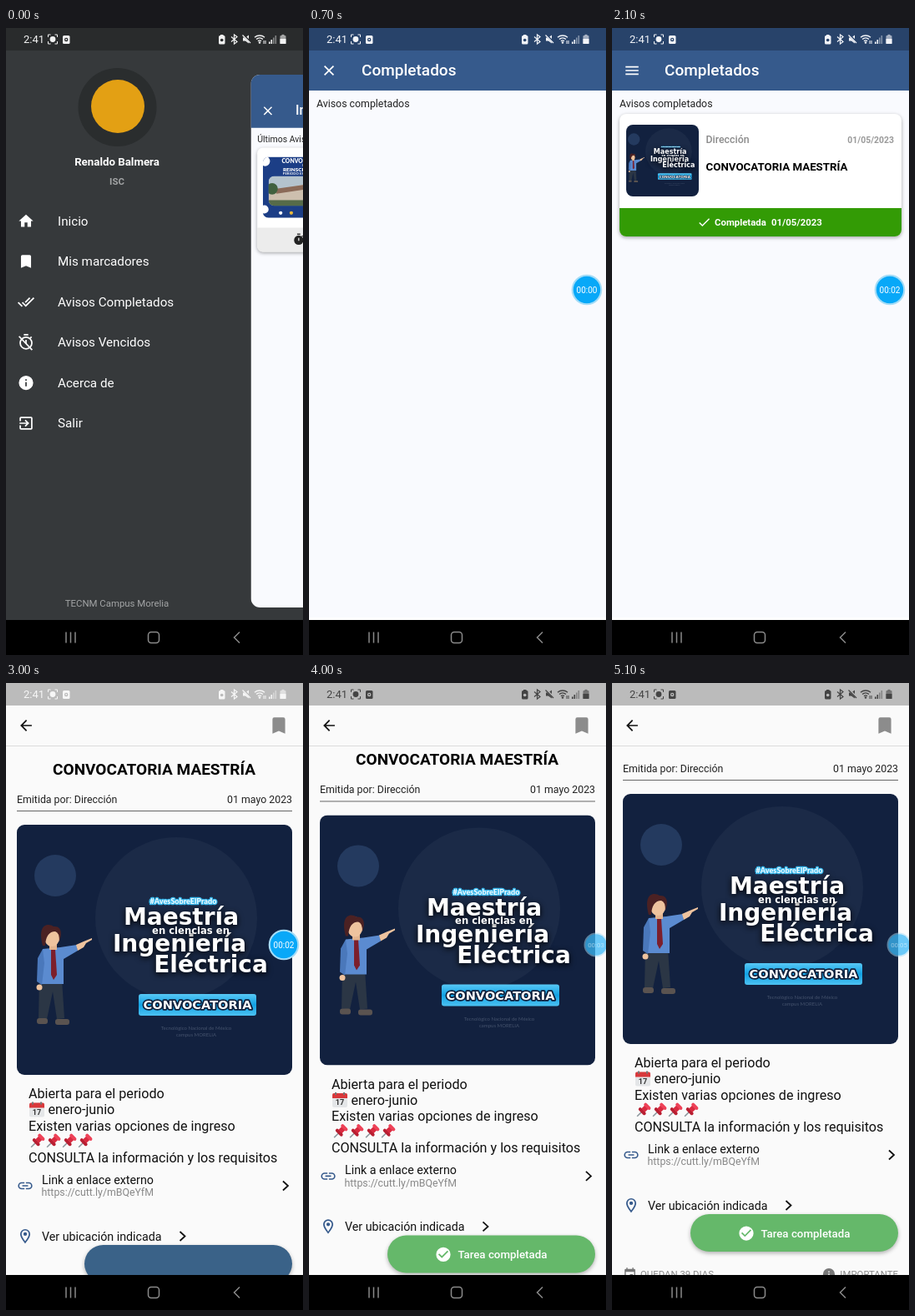
Recreate the animation shown at these times as an HTML page with a canvas. Size 356 px wide and 752 px high, loop 5.3 s.

```html
<!DOCTYPE html>
<html lang="es">
<head>
<meta charset="utf-8">
<title>Avisos</title>
<style>
html, body { margin: 0; width: 100%; height: 100%; overflow: hidden; background: #000; }
canvas { display: block; width: 356px; height: 752px; }
</style>
</head>
<body>
<canvas id="stage"></canvas>
<script>
const W = 356, H = 752, NAV = 710, LOOP = 5300;
const cv = document.getElementById('stage');
const dpr = window.devicePixelRatio || 1;
cv.width = W * dpr;
cv.height = H * dpr;
const c = cv.getContext('2d');

const BLUE = '#365a8c', PAGE = '#f9fafe', NAVY = '#12213f';
const ICONS = {
  home: 'M10 20v-6h4v6h5v-8h3L12 3 2 12h3v8z',
  mark: 'M17 3H7a2 2 0 0 0-2 2v16l7-3 7 3V5a2 2 0 0 0-2-2z',
  doneAll: 'M18 7l-1.4-1.4-6.35 6.35 1.4 1.4zM22.2 5.6 11.66 16.17 7.5 12l-1.4 1.4L11.66 19l12-12zM.4 13.4 6 19l1.4-1.4L1.8 12z',
  info: 'M12 2a10 10 0 1 0 0 20 10 10 0 1 0 0-20zm1 15h-2v-6h2zm0-8h-2V7h2z',
  exit: 'M10.1 15.6 11.5 17l5-5-5-5-1.4 1.4 2.6 2.6H3v2h9.7zM19 3H5a2 2 0 0 0-2 2v4h2V5h14v14H5v-4H3v4a2 2 0 0 0 2 2h14a2 2 0 0 0 2-2V5a2 2 0 0 0-2-2z',
  link: 'M3.9 12A3.1 3.1 0 0 1 7 8.9h4V7H7a5 5 0 0 0 0 10h4v-1.9H7A3.1 3.1 0 0 1 3.9 12zM8 13h8v-2H8zm9-6h-4v1.9h4a3.1 3.1 0 0 1 0 6.2h-4V17h4a5 5 0 0 0 0-10z',
  place: 'M12 2a7 7 0 0 0-7 7c0 5.25 7 13 7 13s7-7.75 7-13a7 7 0 0 0-7-7zM7 9a5 5 0 0 1 10 0c0 2.9-2.9 7.2-5 9.9C9.9 16.2 7 11.9 7 9zM12 6.5a2.5 2.5 0 0 0 0 5 2.5 2.5 0 0 0 0-5z',
  back: 'M20 11H7.8l5.6-5.6L12 4l-8 8 8 8 1.4-1.4L7.8 13H20z',
  menu: 'M3 18h18v-2H3zm0-5h18v-2H3zm0-7v2h18V6z',
  close: 'M19 6.4 17.6 5 12 10.6 6.4 5 5 6.4l5.6 5.6L5 17.6 6.4 19l5.6-5.6 5.6 5.6 1.4-1.4-5.6-5.6z',
  check: 'M9 16.2 4.8 12l-1.4 1.4L9 19 21 7l-1.4-1.4z',
  done: 'M12 2a10 10 0 1 0 0 20 10 10 0 1 0 0-20zM10 17l-5-5 1.4-1.4 3.6 3.6 7.6-7.6L19 8z',
  event: 'M17 12h-5v5h5zM16 1v2H8V1H6v2H5a2 2 0 0 0-2 2v14a2 2 0 0 0 2 2h14a2 2 0 0 0 2-2V5a2 2 0 0 0-2-2h-1V1zM19 19H5V8h14z'
};
for (const k in ICONS) ICONS[k] = new Path2D(ICONS[k]);

const clamp = v => Math.max(0, Math.min(1, v));
const ramp = (t, a, b) => clamp((t - a) / (b - a));
const mix = (a, b, k) => a + (b - a) * k;

function rect(x, y, w, h, color) {
  c.fillStyle = color;
  c.fillRect(x, y, w, h);
}
function round(x, y, w, h, r) {
  c.beginPath();
  c.roundRect(x, y, w, h, r);
}
function box(x, y, w, h, r, color) {
  round(x, y, w, h, r);
  c.fillStyle = color;
  c.fill();
}
function disc(x, y, r, color) {
  c.beginPath();
  c.arc(x, y, r, 0, 7);
  c.fillStyle = color;
  c.fill();
}
function poly(color, ...p) {
  c.beginPath();
  for (let i = 0; i < p.length; i += 2) c.lineTo(p[i], p[i + 1]);
  c.closePath();
  c.fillStyle = color;
  c.fill();
}
function line(color, width, ...p) {
  c.beginPath();
  for (let i = 0; i < p.length; i += 2) c.lineTo(p[i], p[i + 1]);
  c.strokeStyle = color;
  c.lineWidth = width;
  c.stroke();
}
// y is the middle of the capitals
function text(s, x, y, size, color, weight = 400, align = 'left', family = 'Roboto') {
  c.font = `${weight} ${size}px ${family}, sans-serif`;
  c.textAlign = align;
  c.fillStyle = color;
  c.fillText(s, x, y + size * 0.355);
}
function outlined(s, x, y, size, color, edge, width, family) {
  c.font = `900 ${size}px ${family}, sans-serif`;
  c.textAlign = 'center';
  c.lineJoin = 'round';
  c.strokeStyle = edge;
  c.lineWidth = width;
  c.strokeText(s, x, y + size * 0.355);
  text(s, x, y, size, color, 900, 'center', family);
}
function icon(name, x, y, color, size = 20.7) {
  c.save();
  c.translate(x - size / 2, y - size / 2);
  c.scale(size / 24, size / 24);
  c.fillStyle = color;
  c.fill(ICONS[name], 'evenodd');
  c.restore();
}
function shadow(blur, y, alpha) {
  c.shadowColor = `rgba(0,0,0,${alpha})`;
  c.shadowBlur = blur * dpr;
  c.shadowOffsetY = y * dpr;
}
function group(draw) {
  c.save();
  draw();
  c.restore();
}

function timerCrown(x, y, r, color) {
  rect(x - r * 0.38, y - r * 1.55, r * 0.76, r * 0.26, color);
  line(color, r * 0.25, x + r * 0.7, y - r * 0.8, x + r * 0.95, y - r * 1.05);
}
function timerFull(x, y, r, color, hand) {
  timerCrown(x, y, r, color);
  disc(x, y, r * 1.1, color);
  line(hand, r * 0.25, x, y - r * 0.55, x, y + r * 0.15);
}
function timerOff(x, y, r, color) {
  timerCrown(x, y, r, color);
  c.beginPath();
  c.arc(x, y, r, 0, 7);
  c.strokeStyle = color;
  c.lineWidth = r * 0.25;
  c.stroke();
  line(color, r * 0.25, x, y - r * 0.55, x, y + r * 0.15);
  line(color, r * 0.25, x - r * 1.2, y - r * 1.15, x + r * 1.05, y + r * 1.2);
}

function statusBar(bg, ink) {
  rect(0, 0, W, 27, bg);
  text('2:41', 21, 13.5, 13, ink);
  for (const sx of [-1, 1]) for (const sy of [-1, 1])
    line(ink, 1, 56 + sx * 5.5, 13.5 + sy * 2.5, 56 + sx * 5.5, 13.5 + sy * 5.5, 56 + sx * 2.5, 13.5 + sy * 5.5);
  disc(56, 13.5, 3.4, ink);
  box(68, 9, 8.5, 10, 1.5, ink);
  disc(72.2, 14, 2.2, bg);
  rect(71.4, 13, 1.6, 1.6, ink);
  box(255, 9, 7.5, 10.5, 1.5, ink);
  rect(257, 8, 3.5, 2, ink);
  disc(258.7, 14.5, 1.8, bg);
  line(ink, 1.2, 270, 10.5, 277, 16.5, 273.5, 19, 273.5, 8, 277, 10.5, 270, 16.5);
  poly(ink, 284, 11.5, 287, 11.5, 291, 8.5, 291, 18.5, 287, 15.5, 284, 15.5);
  line(bg, 2.5, 284, 8, 294, 18);
  line(ink, 1.2, 283.5, 8.5, 293, 18);
  c.strokeStyle = ink;
  c.lineWidth = 1.4;
  for (const r of [3, 6, 9]) {
    c.beginPath();
    c.arc(304, 18, r, -2.3, -0.84);
    c.stroke();
  }
  disc(304, 17.5, 1.3, ink);
  line(ink, 1, 309, 15, 309, 19);
  line(ink, 1, 311, 15, 311, 19);
  for (let i = 0; i < 4; i++) {
    c.globalAlpha = i < 2 ? 1 : 0.45;
    rect(315 + i * 2.5, 16.5 - i * 2.5, 1.6, 2.5 + i * 2.5, ink);
  }
  c.globalAlpha = 0.6;
  box(328.5, 9, 7, 10, 1, ink);
  rect(330.5, 7.8, 3, 1.5, ink);
  c.globalAlpha = 1;
  rect(328.5, 13, 7, 6, ink);
}

function navBar() {
  rect(0, NAV, W, H - NAV, '#000');
  const g = '#8a8a8a';
  for (const x of [72, 77.5, 83]) line(g, 1.5, x, 724.5, x, 737.5);
  round(170.5, 724.5, 13, 13, 3.5);
  c.strokeStyle = g;
  c.lineWidth = 1.5;
  c.stroke();
  line(g, 1.5, 280, 724.5, 273.5, 731, 280, 737.5);
}

function person() {
  poly('#2b3645', 27, 186, 54, 186, 57, 232, 48, 233, 43, 200, 36, 233, 26, 232);
  box(24, 232, 13, 7, 3, '#5a5350');
  box(46, 233, 17, 7, 3, '#5a5350');
  poly('#5b8bd0', 31, 149, 52, 147, 72, 144, 73, 151, 56, 161, 56, 191, 29, 191);
  poly('#4a78bb', 31, 149, 25, 160, 24, 188, 30, 192, 33, 166);
  disc(27, 195, 3.5, '#eec39e');
  poly('#7c1f2c', 41, 149, 46, 149, 48, 180, 44, 186, 41, 180);
  poly('#eec39e', 71, 144, 80, 140, 90, 136, 90, 138, 83, 142, 80, 147, 73, 151);
  rect(39, 141, 9, 9, '#e2b48f');
  c.beginPath();
  c.ellipse(42, 134, 9.5, 12, 0, 0, 7);
  c.fillStyle = '#eec39e';
  c.fill();
  c.beginPath();
  c.moveTo(31, 145);
  c.bezierCurveTo(24, 118, 38, 118, 44, 122);
  c.bezierCurveTo(56, 121, 53, 135, 51, 140);
  c.quadraticCurveTo(51, 129, 46, 128);
  c.quadraticCurveTo(35, 128, 34, 145);
  c.fillStyle = '#4b2123';
  c.fill();
}

// 330 x 300 poster
function poster() {
  const wide = 'DejaVu Sans';
  const title = (s, x, y, size) => text(s, x, y, size, '#fff', 700, 'center', wide);
  rect(0, 0, 330, 300, NAVY);
  disc(191, 112, 97, '#1b2a47');
  disc(46, 61, 25, '#243a5f');
  person();
  outlined('#AvesSobreElPrado', 199.5, 92, 9, '#e8f8ff', '#35b5ea', 2.5, 'Lato');
  group(() => {
    shadow(7, 2, 1);
    title('Maestría', 197, 110.5, 28);
    title('Ingeniería', 195, 142.5, 28);
    title('Eléctrica', 232.5, 167.5, 28);
    title('en ciencias en', 208.5, 126.5, 11.6);
  });
  const g = c.createLinearGradient(0, 203, 0, 229);
  g.addColorStop(0, '#58c8f5');
  g.addColorStop(0.5, '#12a2e4');
  g.addColorStop(1, '#4cc2f2');
  box(146, 203, 141, 26, 3, g);
  outlined('CONVOCATORIA', 216.5, 216.3, 14.6, '#fff', '#10203c', 3.5, wide);
  text('Tecnológico Nacional de México', 215, 244, 6, '#44526c', 400, 'center', 'Lato');
  text('campus MORELIA', 215, 252, 6, '#44526c', 400, 'center', 'Lato');
}

function cardBase(footer) {
  group(() => {
    shadow(4, 1.5, 0.35);
    box(9, 103, 338, 147, 8, '#fff');
  });
  box(9, 216, 338, 34, [0, 0, 8, 8], footer);
}

function appBar(title, glyph) {
  rect(0, 0, W, 75, BLUE);
  icon(glyph, 24, 51, '#fff');
  text(title, 63, 50, 19, '#fff', 500);
}

function homePage() {
  rect(0, 0, W, H, PAGE);
  appBar('Inicio', 'close');
  text('Últimos Avisos', 9, 91, 12.35, '#222');
  cardBase('#ececec');
  group(() => {
    round(17, 116, 87, 86, 8);
    c.clip();
    rect(17, 116, 87, 86, '#1c3e86');
    disc(20, 122, 7, '#fff');
    disc(19, 190, 6, '#fff');
    group(() => {
      round(25, 143, 90, 42, 8);
      c.clip();
      rect(25, 143, 90, 42, '#b4c3cd');
      poly('#cdbfae', 25, 164, 104, 150, 104, 178, 25, 178);
      poly('#8b6a58', 36, 161, 104, 151, 104, 158, 36, 168);
      disc(30, 161, 8, '#41613f');
      rect(25, 177, 90, 9, '#566b49');
    });
    disc(42, 195, 2.5, '#fff');
    disc(57, 195, 2.5, '#e8b83c');
    text('CONVOCATORIA', 76, 122, 8, '#fff', 900, 'center', 'Lato');
    text('DE', 76, 128, 5, '#fff', 900, 'center', 'Lato');
    text('REINSCRIPCIÓN', 74, 133.5, 7.5, '#fff', 900, 'center', 'Lato');
    text('PERIODO ESCOLAR', 68, 139.5, 5, '#fff', 700, 'center', 'Lato');
  });
  timerFull(67.5, 233.5, 6, '#222', '#ececec');
}

function drawer() {
  rect(0, 0, W, NAV, '#36393b');
  statusBar('#292b2c', '#f2f2f2');
  disc(133.5, 95, 47, '#2a2d2e');
  disc(134, 94, 32, '#e3a014');
  text('Renaldo Balmera', 133, 160.5, 13.3, '#fff', 700, 'center');
  text('ISC', 133, 184, 11.4, '#a3a5a6', 700, 'center');
  const rows = [['home', 'Inicio'], ['mark', 'Mis marcadores'], ['doneAll', 'Avisos Completados'],
    ['', 'Avisos Vencidos'], ['info', 'Acerca de'], ['exit', 'Salir']];
  rows.forEach(([glyph, label], i) => {
    const y = 231.5 + i * 48.5;
    if (glyph) icon(glyph, 24, y, '#fff');
    else timerOff(24, y + 0.8, 7, '#fff');
    text(label, 62, y, 15.2, '#fff');
  });
  text('TECNM Campus Morelia', 133, 690, 11.4, '#a3a5a6', 400, 'center');
  group(() => {
    round(293.5, 56, 100, 639, 11);
    c.clip();
    c.translate(293.5, 56);
    c.scale(0.85, 0.85);
    homePage();
  });
}

function doneCard() {
  cardBase('#339b05');
  group(() => {
    round(17, 116, 87, 86, 8);
    c.clip();
    c.translate(13, 116);
    c.scale(0.2875, 0.2875);
    poster();
  });
  text('Dirección', 112.5, 134, 12.35, '#8b8b8b', 500);
  text('01/05/2023', 338, 134, 10.45, '#9a9a9a', 700, 'right');
  text('CONVOCATORIA MAESTRÍA', 112.5, 166, 13.3, '#000', 700);
  icon('check', 110.5, 233, '#fff', 17.5);
  text('Completada', 123, 232.5, 11.4, '#fff', 700);
  text('01/05/2023', 191, 232.5, 11.4, '#fff', 700);
}

function listPage(t) {
  rect(0, 0, W, NAV, PAGE);
  rect(0, 707, W, 4, '#fff');
  appBar('Completados', t < 800 ? 'close' : 'menu');
  statusBar('#28436a', '#f2f4f8');
  text('Avisos completados', 9, 91, 12.35, '#222');
  const k = ramp(t, 1400, 1700);
  if (k > 0) group(() => {
    c.globalAlpha = k;
    c.translate(0, 115 * (1 - k) ** 2);
    doneCard();
  });
}

function calendar(x, y) {
  box(x, y, 18, 17, 2, '#e4e6e8');
  box(x, y, 18, 6, [2, 2, 0, 0], '#d8383b');
  for (const d of [4, 14]) rect(x + d - 1, y - 1, 2, 3, '#777');
  text('17', x + 9, y + 11.3, 9, '#333', 700, 'center');
}

function pin(x, y) {
  group(() => {
    c.translate(x, y);
    c.rotate(0.8);
    line('#8d979d', 1.5, 0, 3, 0, 11);
    box(-5.5, 0.5, 11, 4, 2, '#b81f32');
    rect(-3, -5, 6, 6, '#d92a40');
    box(-5, -8, 10, 4, 2, '#ee4258');
  });
}

function chevron(x, y) {
  line('#111', 1.8, x - 3, y - 5.5, x + 3, y, x - 3, y + 5.5);
}

function actionButton(t) {
  const k = ramp(t, 3000, 3500);
  const rgb = [mix(58, 101, k), mix(98, 184, k), mix(136, 106, k)].map(Math.round);
  group(() => {
    shadow(5, 2, 0.3);
    box(94, 674, 249, 45, 22.5, `rgb(${rgb})`);
  });
  group(() => {
    c.globalAlpha = ramp(t, 3500, 3700);
    icon('done', 161, 697, '#fff');
    text('Tarea completada', 178.5, 697, 13.3, '#fff', 500);
  });
}

function detailPage(t) {
  const scroll = 37 * (1 - (1 - ramp(t, 3900, 4300)) ** 1.3);
  rect(0, 0, W, NAV, '#fafafa');
  group(() => {
    c.beginPath();
    c.rect(0, 75, W, NAV - 75);
    c.clip();
    c.translate(0, -scroll);
    text('CONVOCATORIA MAESTRÍA', 177.5, 103, 19, '#000', 700, 'center');
    text('Emitida por: Dirección', 13, 139.5, 12.35, '#222');
    text('01 mayo 2023', 343, 139.5, 12.35, '#222', 400, 'right');
    rect(13, 153, 330, 1, '#666');
    group(() => {
      round(13, 170, 330, 300, 9);
      c.clip();
      c.translate(13, 170);
      poster();
    });
    text('Abierta para el periodo', 27, 492.5, 16.15, '#111');
    calendar(28, 503.5);
    text('enero-junio', 50.5, 511.5, 16.15, '#111');
    text('Existen varias opciones de ingreso', 27, 531, 16.15, '#111');
    for (let i = 0; i < 4; i++) pin(38 + i * 19, 549);
    text('CONSULTA la información y los requisitos', 27, 569, 16.15, '#111');
    icon('link', 23, 603, BLUE);
    text('Link a enlace externo', 43, 595.5, 14.25, '#111');
    text('https://cutt.ly/mBQeYfM', 42.5, 611, 12.35, '#888');
    chevron(335, 603);
    icon('place', 23, 663.5, BLUE);
    text('Ver ubicación indicada', 43, 663.5, 14.25, '#111');
    chevron(211.5, 663.5);
    icon('event', 21.5, 746, '#777', 17);
    text('QUEDAN 39 DIAS', 34, 746, 11.4, '#888');
    icon('info', 260, 746, '#777', 17);
    text('IMPORTANTE', 343, 746, 11.4, '#888', 400, 'right');
    actionButton(t);
  });
  rect(0, 75, W, 1, '#dcdcdc');
  statusBar('#bbbbbb', t < 3100 ? '#f6f6f6' : '#444');
  icon('back', 24, 51, '#111');
  icon('mark', 327, 51, '#8c8c8c', 26);
}

function bubble(t) {
  const dock = ramp(t, 3200, 3500);
  const sec = Math.max(0, Math.floor((t - 100) / 1000));
  group(() => {
    c.globalAlpha = mix(1, 0.5, ramp(t, 3500, 3700));
    c.translate(mix(333, 344, dock), 314);
    const s = mix(1, 0.79, dock);
    c.scale(s, s);
    disc(0, 0, 18.3, '#a4dcf7');
    disc(0, 0, 16.2, '#08a8f8');
    text('00:0' + sec, 0, 0.3, 10, '#fff', 400, 'center');
  });
}

function draw(now) {
  const t = Math.floor((now % LOOP) / 100) * 100;
  c.setTransform(dpr, 0, 0, dpr, 0, 0);
  if (t < 700) drawer();
  else if (t < 3000) listPage(t);
  else detailPage(t);
  navBar();
  if (t >= 300) bubble(t);
}

const start = performance.now();
function tick() {
  draw(performance.now() - start);
  requestAnimationFrame(tick);
}
tick();
</script>
</body>
</html>
```
